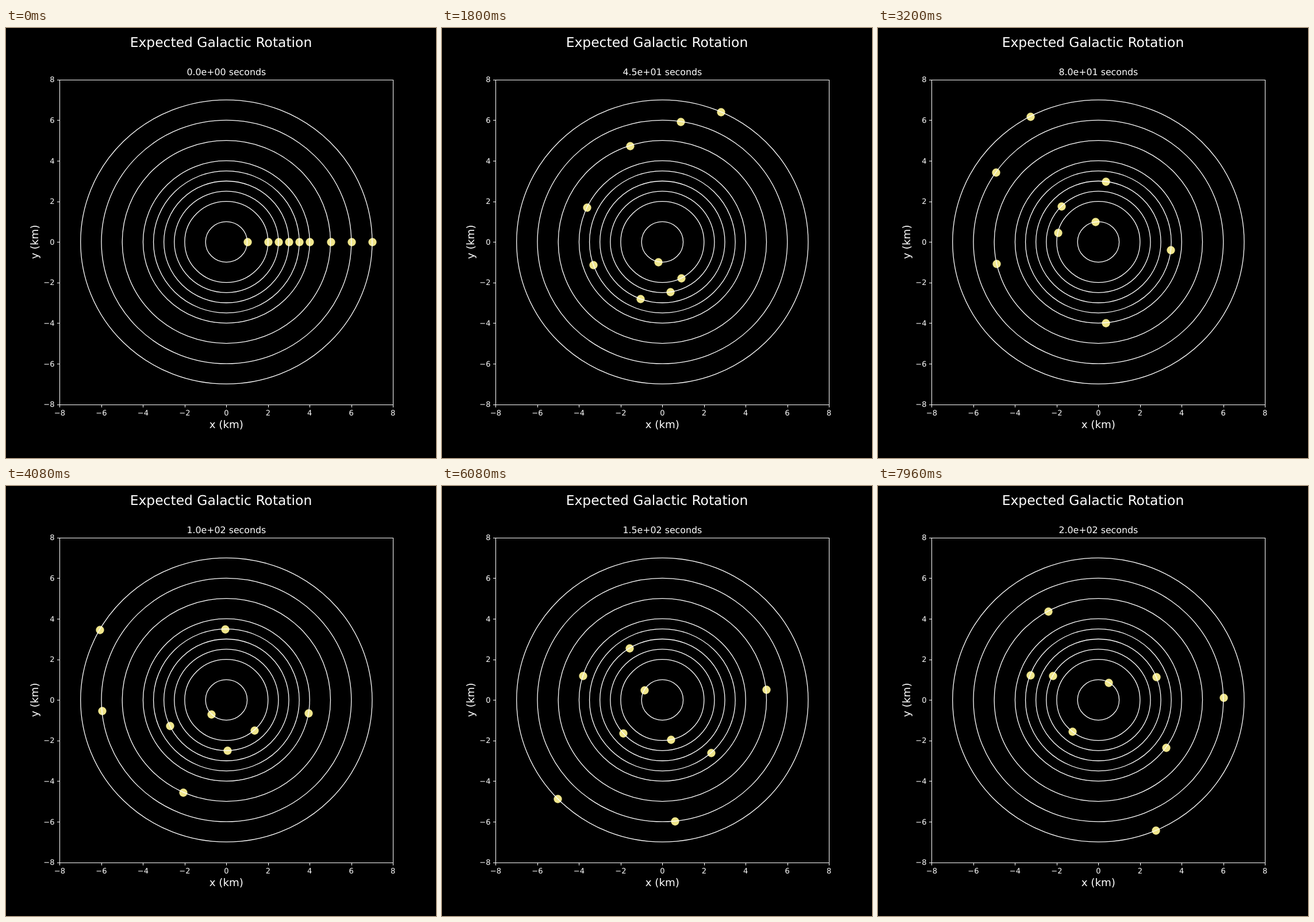
Recreate the animation shown at these times as an HTML page. Size 748 by 748 pixels, loop 8000 ms.

```html
<!DOCTYPE html>
<html lang="en">
<head>
<meta charset="utf-8">
<title>Expected Galactic Rotation</title>
<style>
  html, body { margin: 0; width: 100%; height: 100%; overflow: hidden; background: #000; }
  svg { display: block; width: 748px; height: 748px; }
  text { fill: #fff; font-family: "DejaVu Sans", sans-serif; text-rendering: geometricPrecision; }
</style>
</head>
<body>
<svg id="stage" viewBox="0 0 748 748"></svg>
<script>
const STEP = 40, STEPS = 200;
const LEFT = 93.4, RIGHT = 673.2, TOP = 89.76, BOTTOM = 654.5;
const CX = 383.35, CY = 372.13, SX = 36.231, SY = 35.296;

// Orbit radius and linear speed per step
const ORBITS = [
  [1, .10], [2, .23], [2.5, .27], [3, .29], [3.5, .27],
  [4, .24], [5, .21], [6, .19], [7, .18]
];

const stage = document.getElementById('stage');
const snap = v => Math.floor(v + .5) + .5;

function add(tag, attrs) {
  const el = document.createElementNS('http://www.w3.org/2000/svg', tag);
  for (const key in attrs) el.setAttribute(key, attrs[key]);
  stage.appendChild(el);
  return el;
}

function label(str, x, y, size, anchor = 'middle', more = {}) {
  const el = add('text', { x, y, 'font-size': size, 'text-anchor': anchor, ...more });
  el.textContent = str;
  return el;
}

function stroke(d) {
  add('path', { d, fill: 'none', stroke: '#fff', 'stroke-width': 1.04 });
}

const dots = ORBITS.map(() => add('circle', { r: 7.14, fill: '#f0e68c' }));

for (const [r] of ORBITS) {
  add('ellipse', {
    cx: CX, cy: CY, rx: r * SX, ry: r * SY,
    fill: 'none', stroke: '#fff', 'stroke-width': 1.3
  });
}

const x0 = snap(LEFT), x1 = snap(RIGHT), y0 = snap(TOP), y1 = snap(BOTTOM);
stroke(`M${x0} ${y0}H${x1}V${y1}H${x0}Z`);

for (let v = -8; v <= 8; v += 2) {
  const x = LEFT + (v + 8) / 16 * (RIGHT - LEFT);
  const y = BOTTOM - (v + 8) / 16 * (BOTTOM - TOP);
  const str = String(v).replace('-', '\u2212');
  stroke(`M${snap(x)} ${y1}v4.54M${x0} ${snap(y)}h-4.54`);
  label(str, x, 674, 13);
  label(str, 84.5, Math.round(y + 4.7), 13, 'end');
}

label('Expected Galactic Rotation', 374, 33, 23.4);
label('x (km)', CX, 696, 18.3);
label('y (km)', 0, 0, 18.3, 'middle', { transform: `translate(55.5 ${CY}) rotate(-90)` });
const clock = label('', CX, 82, 15.8);

// Scientific notation, with ties rounded to the even digit
function scientific(n) {
  const tieDown = n > 99 && n % 20 === 5;
  return (tieDown ? n - .1 : n).toExponential(1).replace(/\+(\d)$/, '+0$1');
}

function draw(ms) {
  const n = Math.floor(ms / STEP) % STEPS;
  ORBITS.forEach(([r, speed], i) => {
    const angle = speed / r * n;
    dots[i].setAttribute('cx', snap(CX + r * SX * Math.cos(angle)));
    dots[i].setAttribute('cy', snap(CY - r * SY * Math.sin(angle)));
  });
  clock.textContent = scientific(n) + ' seconds';
}

let start;
function tick(now) {
  start ??= now;
  draw(now - start);
  requestAnimationFrame(tick);
}
draw(0);
requestAnimationFrame(tick);
</script>
</body>
</html>
```
